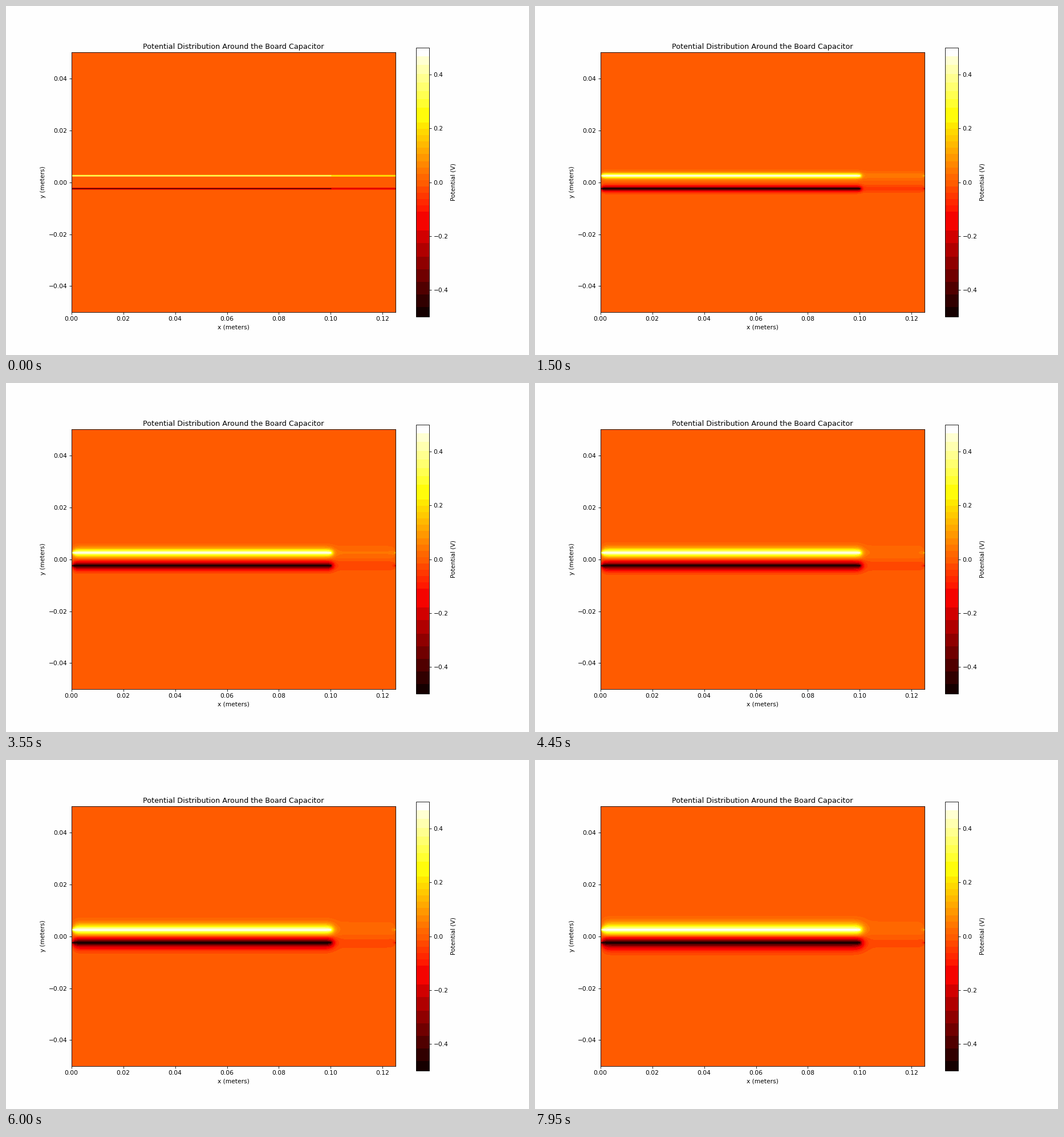
Write a matplotlib script that moves like this. It is 917 px wide and 611 px high and loops after 8000 ms.

```python
import numpy as np
import matplotlib.pyplot as plt
from matplotlib.animation import FuncAnimation
from matplotlib.colors import ListedColormap

WIDTH, HEIGHT, DPI = 917, 611, 76.375
FRAMES, INTERVAL = 160, 50

LENGTH, HALF_HEIGHT = 0.125, 0.05      # domain in meters
STEP = 0.00025                         # grid spacing
PLATE_LENGTH, PLATE_Y = 0.1, 0.0025
VOLTAGE = 0.5
PAPER = 254 / 255


def stepped_hot():
    """The 'hot' map reduced to 8 reds, 16 greens and 8 blues."""
    rgb = plt.get_cmap("hot")(np.arange(256))[:, :3]
    cells = (rgb * 255).astype(int) // [32, 16, 32]
    out = rgb.copy()
    for cell in np.unique(cells, axis=0):
        same = (cells == cell).all(axis=1)
        out[same] = rgb[same].mean(axis=0)
    # the zero level and white keep their own tone
    out[(cells == cells[128]).all(axis=1)] = rgb[128]
    out[(cells == cells[255]).all(axis=1)] = PAPER
    return ListedColormap(out)


def relax(count):
    """Jacobi relaxation of the potential, one state per iteration."""
    rows = round(2 * HALF_HEIGHT / STEP) + 1
    cols = round(LENGTH / STEP) + 1
    mid, gap = rows // 2, round(PLATE_Y / STEP)
    end = round(PLATE_LENGTH / STEP) + 1

    v = np.zeros((rows, cols), dtype=np.float32)
    v[mid + gap] = VOLTAGE
    v[mid - gap] = -VOLTAGE
    states = []
    for _ in range(count):
        new = v.copy()
        new[1:-1, 1:-1] = (v[2:, 1:-1] + v[:-2, 1:-1]
                           + v[1:-1, 2:] + v[1:-1, :-2]) / 4
        new[mid + gap, :end] = VOLTAGE
        new[mid - gap, :end] = -VOLTAGE
        states.append(new)
        v = new
    return states


states = relax(FRAMES)

fig, ax = plt.subplots(figsize=(WIDTH * (1 + 1e-6) / DPI, HEIGHT / DPI),
                       dpi=DPI, facecolor=(PAPER,) * 3)
image = ax.imshow(states[0], origin="lower", cmap=stepped_hot(),
                  extent=(0, LENGTH, -HALF_HEIGHT, HALF_HEIGHT),
                  vmin=-VOLTAGE, vmax=VOLTAGE)
fig.colorbar(image, ax=ax, label="Potential (V)")
ax.set_title("Potential Distribution Around the Board Capacitor")
ax.set_xlabel("x (meters)")
ax.set_ylabel("y (meters)")


def update(i):
    image.set_data(states[i])
    return [image]


anim = FuncAnimation(fig, update, frames=FRAMES, interval=INTERVAL,
                     repeat=True, repeat_delay=0, blit=False)
plt.show()
```
